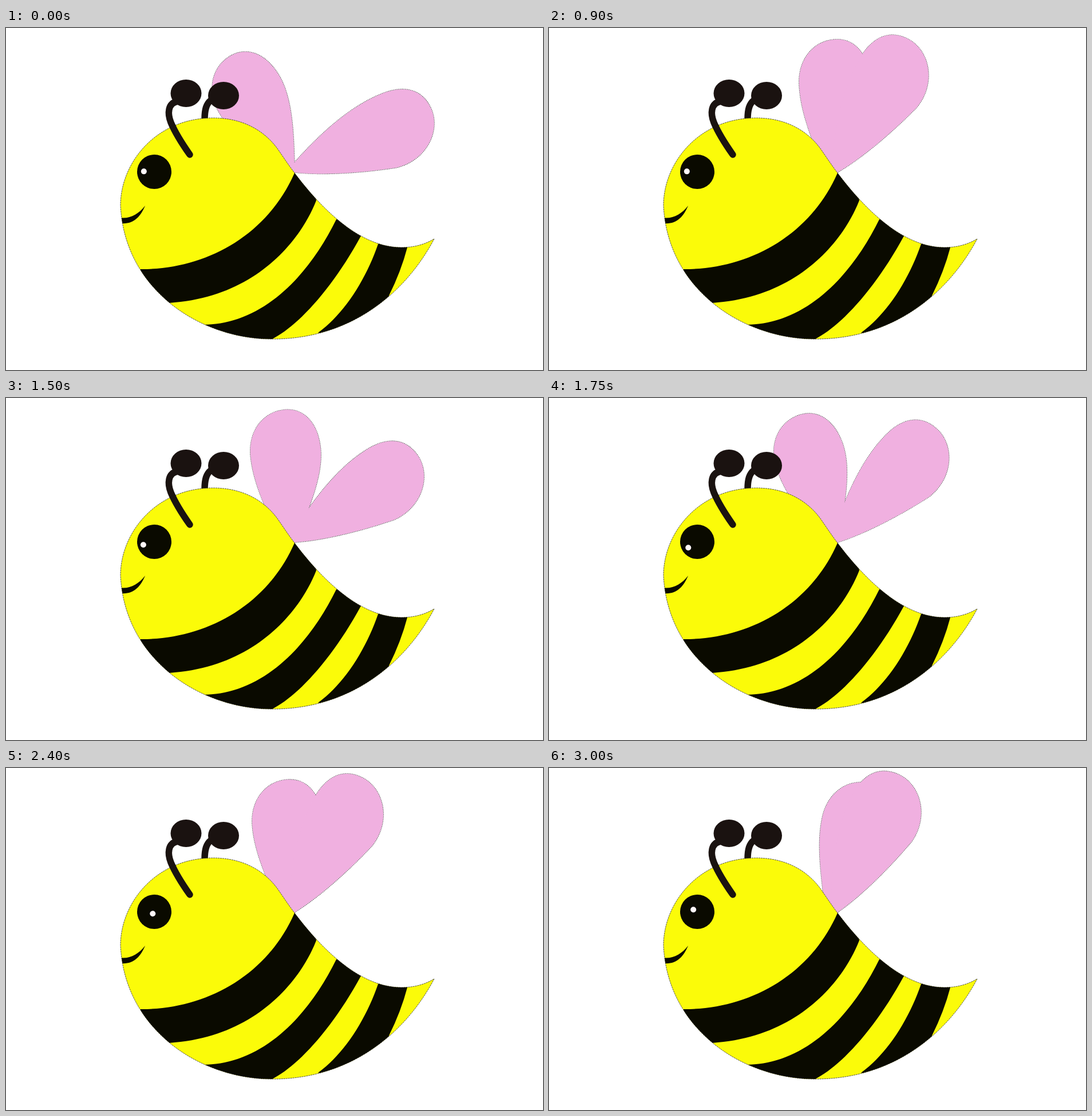
Animation, 938 px wide and 597 px high, one loop 3050 ms. Source, as an HTML page:

```html
<!DOCTYPE html>
<html lang="en">
<head>
<meta charset="utf-8">
<title>Bee</title>
<style>
  html, body { margin: 0; width: 100%; height: 100%; overflow: hidden; background: #fff; }
  svg { display: block; width: 100vw; height: 100vh; }
  .wing { fill: #f0b0e0; }
  .rim { fill: none; stroke: #6e666c; stroke-width: 1.6; stroke-dasharray: 2 1; }
  .skin { fill: #fbfb09; stroke: #45453a; stroke-width: 0.9; stroke-dasharray: 3 1; }
  .dark { fill: #0a0a00; }
  .feeler { fill: none; stroke: #1a1210; stroke-width: 11.5; }
  .knob { fill: #1a1210; }
</style>
</head>
<body>
<svg viewBox="0 0 938 597" preserveAspectRatio="none">
  <defs>
    <path id="body" d="M362 157 C410 157 448 176 473 209 C485 226 494 240 504 253
      C550 314 618 384 692 383 C714 383 733 377 748 368 C702 455 610 543 465 543
      C338 543 207 456 200 310 C200 235 262 157 362 157Z"/>
    <clipPath id="inside"><use href="#body"/></clipPath>
    <path id="left" d="M0 1 C20 -38 61 -105 61 -158 C61 -204 38 -232 5 -232
      C-34 -232 -62 -200 -62 -157 C-62 -110 -44 -62 -22 0Z"/>
    <path id="right" d="M0 0 C50 28 120 50 168 62 C222 70 263 32 263 -8
      C263 -48 234 -67 192 -67 C130 -68 60 -42 -6 -10Z"/>
  </defs>

  <!-- rims lie below both fills so only the joint outline shows -->
  <g class="rim">
    <use class="left" href="#left"/>
    <use class="right" href="#right"/>
  </g>
  <g class="wing">
    <use class="left" href="#left"/>
    <use class="right" href="#right"/>
  </g>

  <path class="feeler" d="M358 126 C350 132 347 142 347 159"/>
  <use class="skin" href="#body"/>

  <g class="dark" clip-path="url(#inside)">
    <path d="M235 421 C345 422 455 365 504 253 L530 240 L542 301
      C512 377 431 471 285 480 L230 490Z"/>
    <path d="M343 518 C450 518 530 430 577 334 L610 335 L620 363
      C570 455 510 520 465 543 L400 570Z"/>
    <path d="M545 532 C592 498 629 438 650 377 L680 350 L701 383
      Q690 425 669 467 L650 560Z"/>
    <path d="M199 331 C215 334 232 325 243 310 C235 330 222 343 201 341Z"/>
  </g>

  <path class="feeler" stroke-linecap="round" d="M300 128 C282 131 282 150 288 165 C296 184 309 204 321 221"/>
  <ellipse class="knob" cx="314.5" cy="114" rx="27" ry="24"/>
  <ellipse class="knob" cx="380" cy="118" rx="27" ry="24"/>

  <circle class="dark" cx="259" cy="251" r="30"/>
  <circle id="glint" r="5" fill="#fff8fa"/>
</svg>
<script>
  const LOOP = 3050, STEP = 50;

  // wing beat in degrees at a few steps; the pace between them is even
  const BEATS = [[0, -49], [10, 492], [25, 1334], [35, 1695], [43, 2171], [53, 2582], [60, 3037]];

  const glint = document.getElementById('glint');
  const rad = a => a * Math.PI / 180;
  const cos = a => Math.cos(rad(a));
  const sin = a => Math.sin(rad(a));

  function smooth(x) {
    const k = Math.min(1, Math.max(0, x));
    return k * k * (3 - 2 * k);
  }

  function beatAt(step) {
    const n = BEATS.findIndex(([s]) => s >= step);
    const [s1, b1] = BEATS[n], [s0, b0] = BEATS[Math.max(0, n - 1)];
    return b1 - (b1 - b0) * (s1 - step) / (s1 - s0 || 1);
  }

  function turn(side, angle) {
    for (const el of document.querySelectorAll('use.' + side))
      el.setAttribute('transform', `translate(504 252) rotate(${angle})`);
  }

  function draw(step) {
    const beat = beatAt(step);
    // the left wing runs ahead, except mid-loop where both fall into step
    const lead = 44 * (1 - Math.exp(-(((step - 25) / 6) ** 2)));
    turn('left', -8 - 22 * cos(beat + lead));
    turn('right', -40 + 26 * cos(beat));

    // the eye glint rests, then swings round under the pupil's centre
    const swing = 210 - 270 * smooth((step - 20) / 40);
    glint.setAttribute('cx', 248 + 8.3 * cos(swing));
    glint.setAttribute('cy', 254.5 + 8.3 * sin(swing));
  }

  const start = performance.now();
  function tick() {
    const t = (performance.now() - start) % LOOP;
    draw(Math.floor(t / STEP));
    requestAnimationFrame(tick);
  }
  tick();
</script>
</body>
</html>
```
